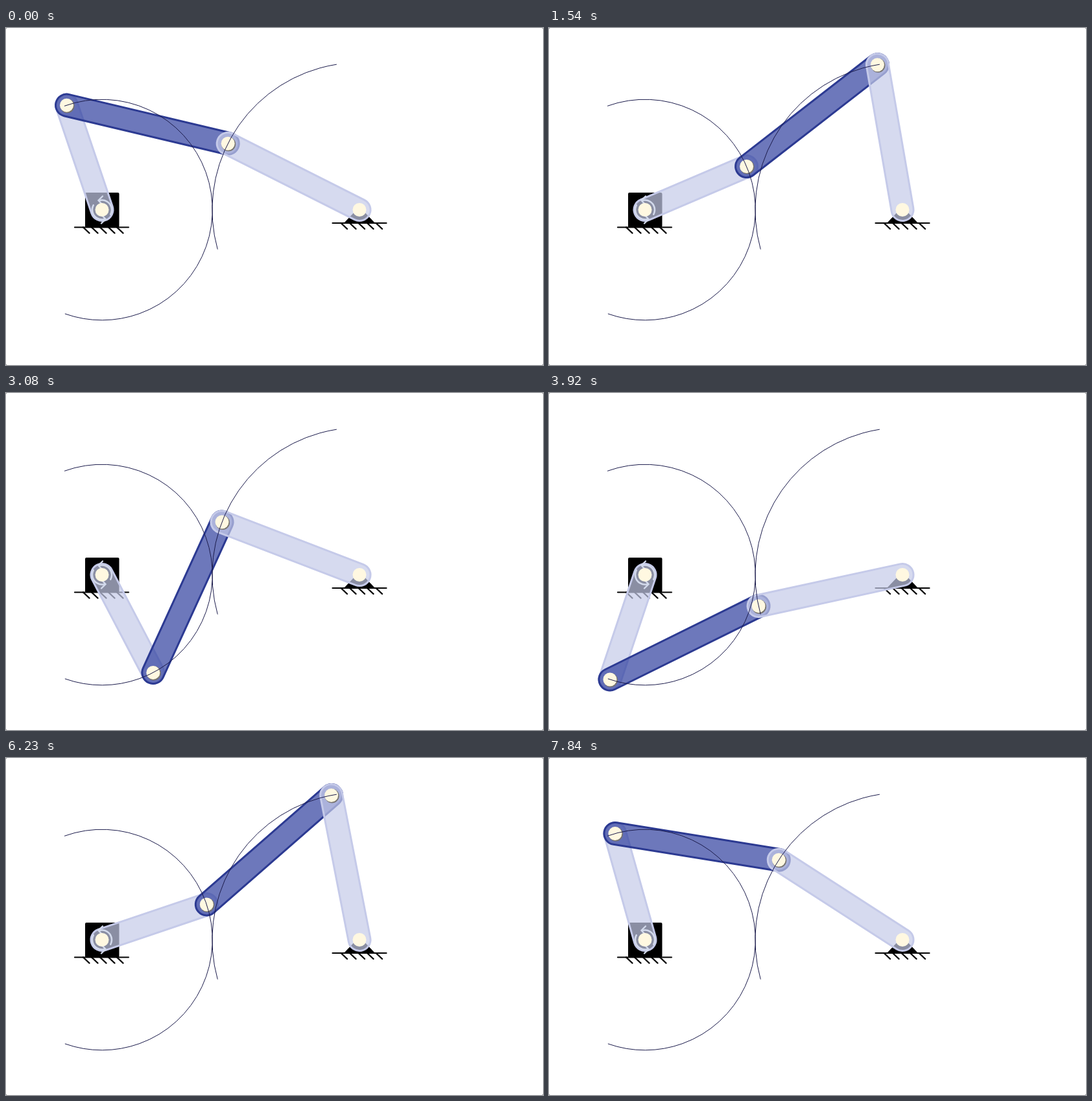
Write an HTML page with a canvas that moves like this. It is 828 by 520 pixels and loops after 7910 ms.

```html
<!DOCTYPE html>
<html lang="en">
<head>
<meta charset="utf-8">
<title>Four-bar linkage</title>
<style>
html, body { margin: 0; width: 100%; height: 100%; overflow: hidden; background: #777; }
canvas { display: block; background: #fff; border-radius: 2px; }
</style>
</head>
<body>
<canvas id="stage" width="828" height="520"></canvas>
<script>
const g = document.getElementById('stage').getContext('2d');
const STEP = 70, STEPS = 113;
const O = [148, 280.5], Q = [545, 280.5];
const CRANK = 170.3, COUPLER = 255.6, ROCKER = 227.1;
const LIGHT = ['#c5cae9', 'rgba(197,202,233,.7)'];
const DARK = ['#2c3a92', 'rgba(48,63,159,.7)'];
const rad = d => d * Math.PI / 180;

// Crank angle in degrees at a few steps; the motor sweeps evenly and reverses.
const SWEEP = [[0, 108.65], [12, 62.7], [32, -16.4], [36, -31.7], [56, -108.5],
  [72, -47.5], [89, 18.7], [112, 105.7], [113, 108.65]];

function crankAngle(step) {
  const i = SWEEP.findIndex(k => k[0] > step);
  const [s0, a0] = SWEEP[i - 1], [s1, a1] = SWEEP[i];
  return rad(a0 + (a1 - a0) * (step - s0) / (s1 - s0));
}

// Upper meeting point of the coupler around A and the rocker around Q.
function joint(A) {
  const dx = Q[0] - A[0], dy = Q[1] - A[1], d = Math.hypot(dx, dy);
  const along = (COUPLER ** 2 - ROCKER ** 2 + d * d) / (2 * d);
  const up = Math.sqrt(Math.max(0, COUPLER ** 2 - along ** 2));
  return [A[0] + (along * dx + up * dy) / d, A[1] + (along * dy - up * dx) / d];
}

function line(points, color, width) {
  g.beginPath();
  points.forEach(p => g.lineTo(...p));
  g.strokeStyle = color;
  g.lineWidth = width;
  g.stroke();
}

function arc([x, y], r, from, to, color, width) {
  g.beginPath();
  g.arc(x, y, r, rad(from), rad(to));
  g.strokeStyle = color;
  g.lineWidth = width;
  g.stroke();
}

function disc(x, y, r, color) {
  g.beginPath();
  g.arc(x, y, r, 0, 7);
  g.fillStyle = color;
  g.fill();
}

function pin([x, y], shadow) {
  if (shadow) disc(x + 1, y + 1, 11, '#77746f');
  disc(x, y, 10.5, '#fff8e1');
}

function bar(P, R, [edge, fill]) {
  const a = Math.atan2(R[1] - P[1], R[0] - P[0]), h = Math.PI / 2;
  g.beginPath();
  g.arc(...P, 17, a + h, a - h);
  g.arc(...R, 17, a - h, a + h);
  g.closePath();
  g.fillStyle = fill;
  g.fill();
  g.strokeStyle = edge;
  g.lineWidth = 3;
  g.stroke();
}

function ground(x, y, first, pitch) {
  line([[x, y], [x + 83, y]], '#000', 2.2);
  for (let i = 0; i < 5; i++) {
    const h = first + i * pitch;
    line([[h, y], [h + 9.5, y + 9]], '#000', 2.4);
  }
}

function supports() {
  g.fillStyle = '#000';
  g.beginPath();
  g.roundRect(122, 254, 52.5, 53.5, 2);
  g.fill();
  ground(106, 307.5, 119, 13);
  g.beginPath();
  [[521, 301], [540, 281], [550, 281], [569, 301]].forEach(p => g.lineTo(...p));
  g.fill();
  ground(503.5, 301, 516.5, 13.5);
}

function turnArrows() {
  const color = '#d3daec';
  for (const turn of [0, Math.PI]) {
    g.save();
    g.translate(...O);
    g.rotate(turn);
    arc([0, 0], 15, -105, 28, color, 2.6);
    line([[1, -21], [-5.5, -14.5], [0, -8.5]], color, 2.4);
    g.restore();
  }
}

function draw(step) {
  const t = crankAngle(step);
  const A = [O[0] + CRANK * Math.cos(t), O[1] - CRANK * Math.sin(t)];
  const B = joint(A);
  g.clearRect(0, 0, 828, 520);
  g.lineCap = 'round';
  supports();
  bar(O, A, LIGHT);
  turnArrows();
  pin(O);
  bar(A, B, DARK);
  pin(A, true);
  bar(B, Q, LIGHT);
  pin(B, true);
  pin(Q);
  g.lineCap = 'butt';
  arc(O, 170.3, -109.9, 109.6, '#1b1b4b', 1);
  arc(Q, 227.1, 164.4, 261.1, '#1b1b4b', 1);
}

const start = performance.now();
function tick() {
  draw(Math.floor((performance.now() - start) / STEP) % STEPS);
  requestAnimationFrame(tick);
}
tick();
</script>
</body>
</html>
```
